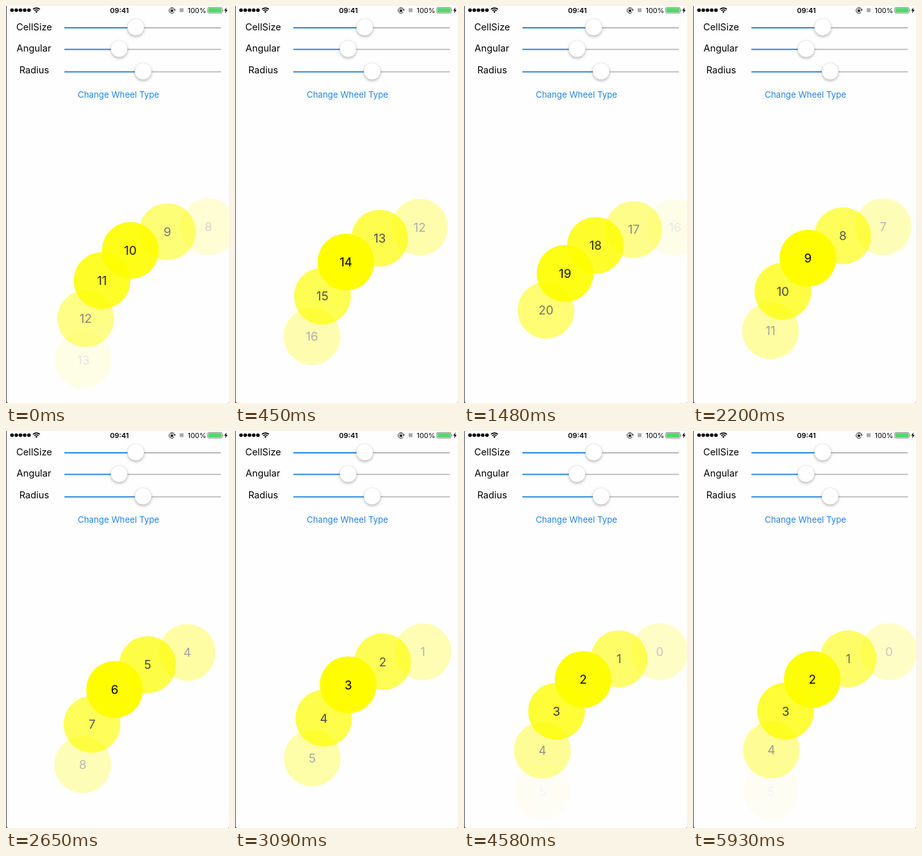
Animation of 348 by 619 pixels, one loop 6.03 s. Source, as an HTML page:

```html
<!DOCTYPE html>
<html lang="en">
<head>
<meta charset="utf-8">
<title>Wheel</title>
<style>
  html, body { margin: 0; width: 100%; height: 100%; overflow: hidden; background: #fefefe; }
  svg { display: block; width: 100%; height: 100%; }
  text { font-family: Inter, Roboto, "Liberation Sans", sans-serif; text-anchor: middle; }
  .label { font-size: 14.7px; }
  .thumb { fill: #fff; stroke: rgba(0, 0, 0, .13); stroke-width: .5; filter: drop-shadow(0 2.5px 2px rgba(0, 0, 0, .28)); }
  .cell text { font-size: 18.8px; }
</style>
</head>
<body>
<svg viewBox="0 0 348 619">
  <rect width="348" height="619" fill="#484848"/>
  <rect x="1" y="-5" width="347.5" height="624" rx="3" fill="#fefefe"/>

  <g id="dots"></g>
  <g fill="none" stroke="#000" stroke-width="1.7">
    <path d="M42.2 5.2a7.6 7.6 0 0 1 10.6 0M44.2 7.4a4.8 4.8 0 0 1 6.6 0"/>
  </g>
  <path d="M47.5 11l-1.9-2.2a2.9 2.9 0 0 1 3.8 0z"/>
  <text x="177" y="10.6" font-size="11" font-weight="600">09:41</text>
  <path d="M262.6 9.4a4.4 4.4 0 1 1 .6-3.6" fill="none" stroke="#222" stroke-width="1"/>
  <path d="M261.4 5.4h3.6l-1.6 2.4z" fill="#222"/>
  <rect x="256.8" y="6" width="4.2" height="3.2" fill="#222"/>
  <path d="M257.6 6v-.8a1.3 1.3 0 0 1 2.6 0v.8" fill="none" stroke="#222" stroke-width=".8"/>
  <rect x="271" y="3.5" width="6" height="6" fill="#a9a9a9"/>
  <text x="298" y="10.6" font-size="11">100%</text>
  <rect x="314.8" y="2.3" width="22.4" height="8.8" rx="1.6" fill="#fff" stroke="#555" stroke-width=".7"/>
  <rect x="315.8" y="3.3" width="20.4" height="6.8" rx=".8" fill="#52d869"/>
  <path d="M338.2 5.2a1.8 1.8 0 0 1 0 3z" fill="#555"/>
  <path d="M344.4 2l-4 5.2h2.4l-1 4.2 4-5.3h-2.4z"/>

  <g id="sliders"></g>
  <text x="175.5" y="142.6" font-size="13.3" fill="#2385e6">Change Wheel Type</text>
  <g id="wheel"></g>
</svg>
<script>
const LOOP = 6030, TICK = 147;
const COUNT = 21, STEP = 20, FOCUS = 45;
const HUB = { x: 305.5, y: 530, r: 186 };

// [tick, item index at the focus angle]
const KEYS = [
  [0, 10.41], [4, 15], [7, 17.3], [9, 18.72], [10, 18.62], [11, 18],
  [15, 9.115], [18, 5.9], [21, 3.06], [23, 1.6], [24, 1.92],
  [25, 2.23], [31, 2.25], [41, 2.255]
];

const byId = id => document.getElementById(id);

function add(parent, tag, attrs, text) {
  const el = document.createElementNS("http://www.w3.org/2000/svg", tag);
  for (const name in attrs) el.setAttribute(name, attrs[name]);
  if (text !== undefined) el.textContent = text;
  return parent.appendChild(el);
}

for (let i = 0; i < 5; i++) add(byId("dots"), "circle", { cx: 9.4 + i * 6.6, cy: 6.5, r: 2.8 });

function slider(name, cx, baseline, y, value) {
  const g = byId("sliders");
  add(g, "text", { class: "label", x: cx, y: baseline }, name);
  add(g, "rect", { x: 91, y: y - .5, width: 244.5, height: 1.9, rx: .9, fill: "#b8b8b8" });
  add(g, "rect", { x: 91, y: y - .5, width: value - 91, height: 1.9, rx: .9, fill: "#2487e4" });
  add(g, "circle", { class: "thumb", cx: value, cy: y - .5, r: 13 });
}
slider("CellSize", 44, 38.4, 33.5, 202.5);
slider("Angular", 43.5, 71.4, 67.2, 176.5);
slider("Radius", 44, 104.6, 102.2, 214);

const wheel = byId("wheel");
const cells = Array.from({ length: COUNT }, (_, i) => {
  const el = add(wheel, "g", { class: "cell" });
  add(el, "circle", { r: 44.3, fill: "#fffd00" });
  add(el, "text", { y: 6.8 }, i);
  return { el, i };
});

// Monotone cubic interpolation
const slope = i => (KEYS[i + 1][1] - KEYS[i][1]) / (KEYS[i + 1][0] - KEYS[i][0]);
function tangent(i) {
  if (i === 0) return slope(0);
  if (i === KEYS.length - 1) return 0;
  const a = slope(i - 1), b = slope(i);
  return a * b > 0 ? 2 * a * b / (a + b) : 0;
}
function position(tick) {
  let i = 0;
  while (i < KEYS.length - 2 && tick >= KEYS[i + 1][0]) i++;
  const [t0, p0] = KEYS[i], [t1, p1] = KEYS[i + 1];
  const h = t1 - t0, u = (tick - t0) / h, v = 1 - u;
  return v * v * ((1 + 2 * u) * p0 + u * h * tangent(i)) +
         u * u * ((1 + 2 * v) * p1 - v * h * tangent(i + 1));
}

let shown = -1;
function draw(now) {
  const tick = Math.min(41, Math.floor((now % LOOP + 6) / TICK));
  if (tick !== shown) {
    shown = tick;
    const pos = position(tick);
    for (const c of cells) {
      c.off = Math.abs(c.i - pos) * STEP;
      const a = (FOCUS + (c.i - pos) * STEP) * Math.PI / 180;
      const x = HUB.x - HUB.r * Math.sin(a), y = HUB.y - HUB.r * Math.cos(a);
      const alpha = Math.max(0, Math.min(1, 1.06 - c.off / 53.5));
      c.el.setAttribute("transform", `translate(${x.toFixed(2)} ${y.toFixed(2)})`);
      c.el.setAttribute("opacity", alpha.toFixed(3));
      c.el.setAttribute("display", alpha > 0 ? "inline" : "none");
    }
    // Nearest to the focus goes on top
    [...cells].sort((a, b) => b.off - a.off).forEach(c => wheel.appendChild(c.el));
  }
}

const start = performance.now();
function frame() {
  draw(performance.now() - start);
  requestAnimationFrame(frame);
}
frame();
</script>
</body>
</html>
```
